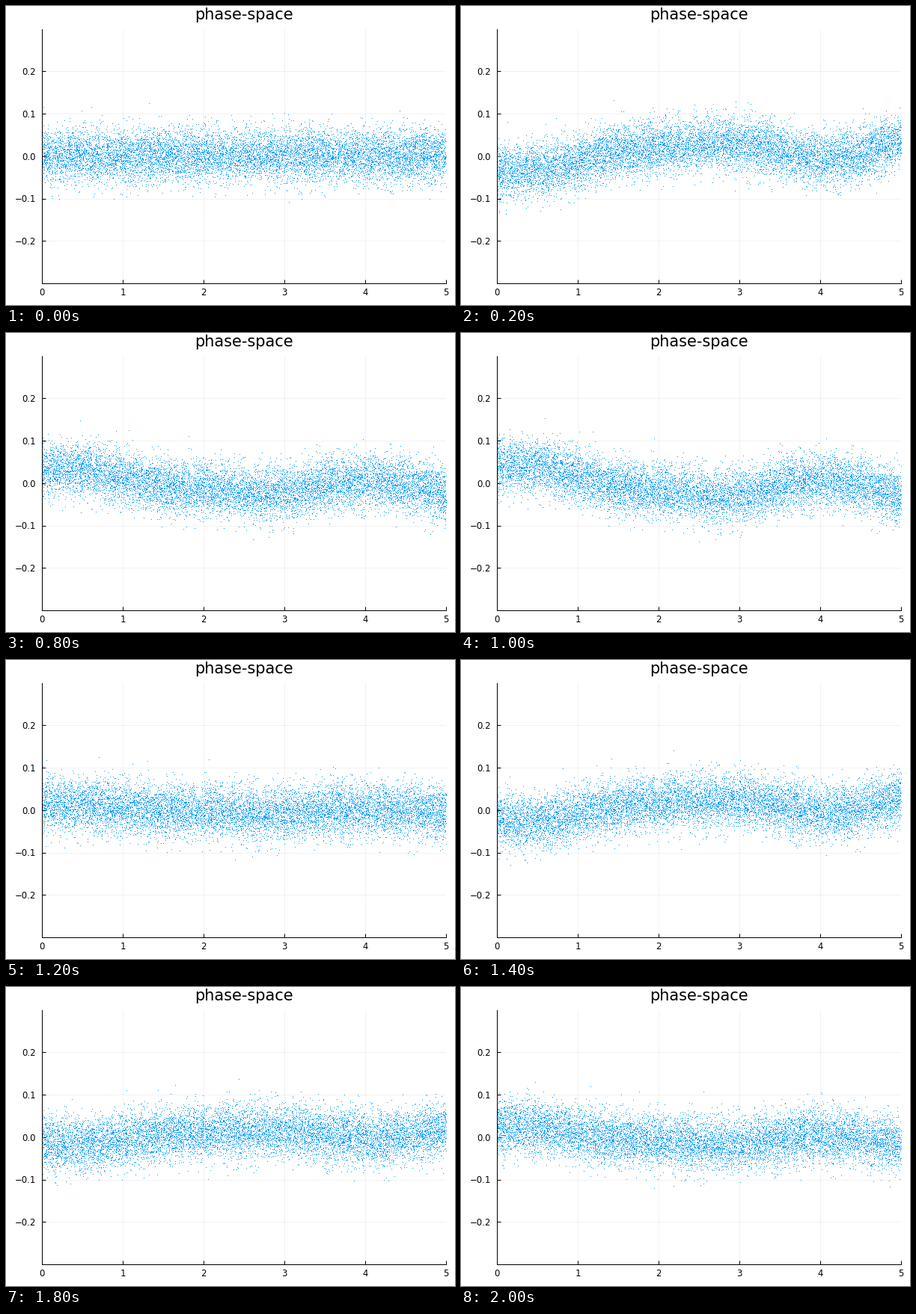
These frames come from a looping animation (600x400 px, 2.2 s). A matplotlib script:

```python
import numpy as np
import matplotlib.pyplot as plt
from matplotlib.animation import FuncAnimation

W, H, DPI = 600, 400, 100
FRAMES, STEP = 11, 200
LENGTH, COUNT, SPREAD = 5.0, 10000, 0.0316
PX = 72 / DPI

plt.rcParams["font.family"] = "DejaVu Sans"
fig = plt.figure(figsize=(W / DPI, H / DPI), dpi=DPI, facecolor="white")
ax = fig.add_axes([48 / W, 29 / H, 540 / W, 340.5 / H])
ax.set(xlim=(0, LENGTH), ylim=(-0.3, 0.3))
ax.set_xticks(range(6))
ax.set_yticks(np.arange(-2, 3) / 10)
ax.yaxis.set_major_formatter("{x:.1f}")
ax.tick_params(direction="in", length=5 * PX, width=PX, labelsize=11.6 * PX)
ax.tick_params(axis="x", pad=6 * PX)
ax.tick_params(axis="y", pad=8 * PX)
ax.grid(color="black", alpha=0.05, linewidth=PX)
ax.set_axisbelow(True)
for side, spine in ax.spines.items():
    spine.set_visible(side in ("left", "bottom"))
    spine.set_linewidth(PX)
fig.text(318.3 / W, 1 - 18 / H, "phase-space", size=20.9 * PX,
         ha="center", va="baseline")

rng = np.random.default_rng(7)
x0 = rng.uniform(0, LENGTH, COUNT)
v0 = rng.normal(0, SPREAD, COUNT)
dots, = ax.plot([], [], ",", color="#009afa", zorder=2)


def wave(x):
    """Velocity amplitude along the box: a ramp plus a few sine modes."""
    modes = (0.015, 0.016, -0.021, 0.003, -0.005, -0.004)
    ripple = sum(a * np.sin(m * np.pi * x / LENGTH)
                 for m, a in enumerate(modes, 1))
    return 0.016 * (x - LENGTH / 2) + ripple


def update(t):
    """Particles drift freely while the wave swings with unit frequency."""
    x = (x0 + v0 * t) % LENGTH
    dots.set_data(x, v0 + wave(x) * np.sin(t))
    return dots,


anim = FuncAnimation(fig, update, frames=FRAMES, interval=STEP,
                     init_func=lambda: update(0), repeat=True,
                     repeat_delay=0, blit=False)
plt.show()
```
